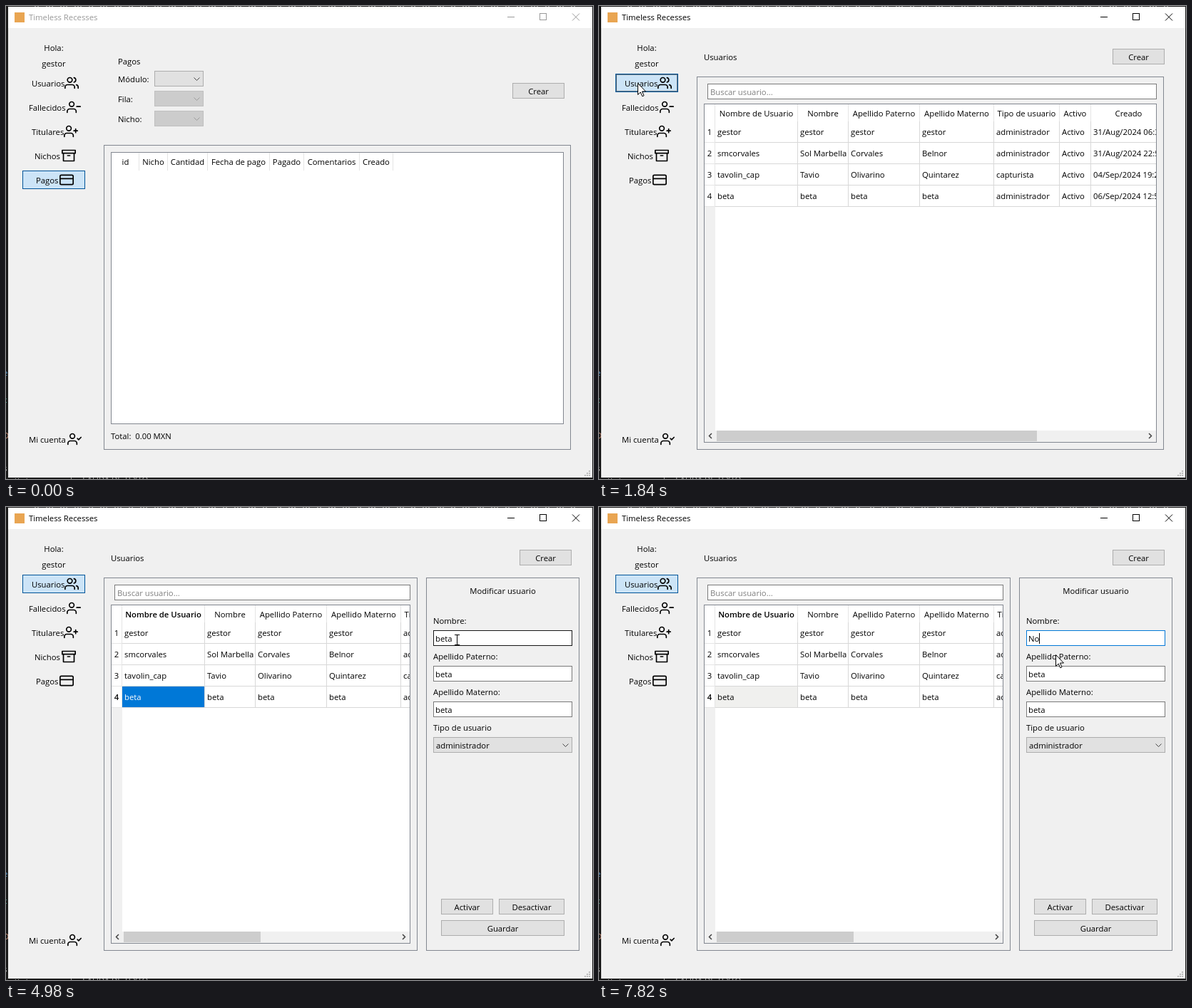
Write an HTML page with a canvas that moves like this. It is 823x664 px and loops after 8000 ms.

```html
<!DOCTYPE html>
<html lang="es">
<head>
<meta charset="utf-8">
<style>
html, body { margin: 0; width: 823px; height: 664px; overflow: hidden; background: #1b1b1b }
canvas { display: block }
</style>
</head>
<body>
<canvas id="stage" width="823" height="664"></canvas>
<script>
const ctx = document.getElementById('stage').getContext('2d');
const LOOP = 8000;
const ACTIVATE = 1570, OPEN_PAGE = 1720, SELECT_CELL = 3550, OPEN_FORM = 3640, FOCUS_FIELD = 5250;
const FONT = "11.3px 'Open Sans', 'Noto Sans', sans-serif";
const FRAME = '#828790', BLUE = '#0078d7';

const bust = 'v-2a4 4 0 0 0-4-4H5a4 4 0 0 0-4 4v2';
const person = 'M16 21' + bust + 'M12.5 7a4 4 0 1 1-8 0a4 4 0 1 1 8 0';
const menu = [
  ['Usuarios', 36, 82, 98, 'M17 21' + bust + 'M13 7a4 4 0 1 1-8 0a4 4 0 1 1 8 0M23 21v-2a4 4 0 0 0-3-3.87M16 3.13a4 4 0 0 1 0 7.75'],
  ['Fallecidos', 32, 85, 132, person + 'M23 11h-6'],
  ['Titulares', 36, 81, 166, person + 'M20 8v6M23 11h-6'],
  ['Nichos', 40, 78, 200, 'M21 8v13H3V8M1 3h22v5H1zM10 12h4'],
  ['Pagos', 42, 75, 234, 'M3 4h18a2 2 0 0 1 2 2v12a2 2 0 0 1-2 2H3a2 2 0 0 1-2-2V6a2 2 0 0 1 2-2zM1 10h22'],
  ['Mi cuenta', 32, 86, 598, person + 'M17 11l2 2 4-4']
].map(([label, textX, iconX, y, path]) => ({ label, textX, iconX, y, path: new Path2D(path) }));

const payments = ['id', 'Nicho', 'Cantidad', 'Fecha de pago', 'Pagado', 'Comentarios', 'Creado'];
const paymentEdges = [148, 186, 226, 282, 369, 417, 495, 542];

const headers = ['Nombre de Usuario', 'Nombre', 'Apellido Paterno', 'Apellido Materno', 'Tipo de usuario', 'Activo', 'Creado'];
const edges = [162, 278, 349, 449, 553, 645, 689, 795];
const rows = [
  ['gestor', 'gestor', 'gestor', 'gestor', 'administrador', 'Activo', '31/Aug/2024 06:32:10'],
  ['smcorvales', 'Sol Marbella', 'Corvales', 'Belnor', 'administrador', 'Activo', '31/Aug/2024 22:51:04'],
  ['tavolin_cap', 'Tavio', 'Olivarino', 'Quintarez', 'capturista', 'Activo', '04/Sep/2024 19:24:37'],
  ['beta', 'beta', 'beta', 'beta', 'administrador', 'Activo', '06/Sep/2024 12:53:18']
];

// Pointer path: time, x, y
const path = [
  [130, 755, 655], [480, 285, 280], [690, 137, 182], [890, 79, 136], [970, 79, 136], [1040, 54, 108],
  [2120, 54, 108], [2340, 100, 285], [2540, 163, 342], [2880, 239, 262],
  [4210, 239, 262], [4450, 330, 282], [4700, 520, 230], [4950, 632, 186],
  [5300, 632, 186], [5860, 640, 230], [6079, 640, 230], [6080, 640, 207], [LOOP, 640, 207]
];
// Contents of the name field as it is edited
const typing = [[0, 'beta'], [6830, 'bet'], [6960, 'be'], [7160, 'b'], [7290, ''], [7620, 'N'], [7820, 'No']];

function fill(x, y, w, h, color) {
  ctx.fillStyle = color;
  ctx.fillRect(x, y, w, h);
}

function box(x, y, w, h, color, border) {
  fill(x, y, w, h, border);
  fill(x + 1, y + 1, w - 2, h - 2, color);
}

function text(str, x, y, color = '#000', align = 'left', bold = false) {
  ctx.font = (bold ? '600 ' : '') + FONT;
  ctx.textAlign = align;
  ctx.fillStyle = color;
  ctx.fillText(str, x, y);
}

function line(points, color, width = 1) {
  ctx.beginPath();
  points.forEach(([x, y]) => ctx.lineTo(x, y));
  ctx.strokeStyle = color;
  ctx.lineWidth = width;
  ctx.stroke();
}

function button(label, x, y, w) {
  box(x, y, w, 22, '#e1e1e1', '#adadad');
  text(label, x + w / 2, y + 16, '#000', 'center');
}

function combo(x, y, w, enabled, label = '') {
  box(x, y, w, 22, enabled ? '#e1e1e1' : '#cccccc', enabled ? '#adadad' : '#bfbfbf');
  text(label, x + 4, y + 16);
  const cx = x + w - 9.5;
  line([[cx - 4, y + 9.5], [cx, y + 13.5], [cx + 4, y + 9.5]], enabled ? '#444' : '#9a9a9a');
}

function pointerAt(t) {
  if (t < path[0][0]) return null;
  const i = path.findIndex(p => p[0] > t);
  const [t0, x0, y0] = path[i - 1], [t1, x1, y1] = path[i];
  const k = (t - t0) / (t1 - t0);
  return { x: Math.round(x0 + (x1 - x0) * k), y: Math.round(y0 + (y1 - y0) * k) };
}

function drawDesktop() {
  fill(0, 0, 823, 664, '#1b1b1b');
  for (let x = 40; x < 800; x += 4) {
    if (Math.sin(x * 12.9) > -0.2) fill(x, 0, 2, 1, '#777');
  }
  [['e', 519, '#569cd6'], ['c', 557, '#4ec9b0'], ['D', 607, '#ce9178'], ['.', 638, '#ccc'], ['s', 653, '#ccc']]
    .forEach(([ch, y, color]) => text(ch, -4, y, color));
  text('u   i', 12, 669, '#aaa');
  text('l     SALIDA DE TEXTO', 90, 669, '#aaa');
}

function drawWindow(active) {
  const ink = active ? '#000' : '#999';
  fill(3, 1, 819, 661, '#f0f0f0');
  fill(3, 1, 819, 30, '#fff');
  fill(12, 9, 14, 14, '#e9a552');
  text('Timeless Recesses', 32, 20, ink);
  fill(703, 15, 10, 1, ink);
  box(748, 10, 10, 10, '#fff', ink);
  line([[794, 10.5], [804, 20.5]], ink);
  line([[804, 10.5], [794, 20.5]], ink);
  for (let r = 0; r < 3; r++)
    for (let c = 0; c <= r; c++) fill(817 - 3 * c, 652 + 3 * r, 2, 2, '#bbb');
}

function drawMenu(t) {
  text('Hola:', 67, 63, '#000', 'center');
  text('gestor', 67, 85, '#000', 'center');
  const lit = [];
  if (t < OPEN_PAGE) lit.push('Pagos');
  if (t >= ACTIVATE) lit.push('Usuarios');
  for (const item of menu) {
    if (lit.includes(item.label)) box(23, item.y - 3, 88, 26, '#cce4f7', '#005499');
    text(item.label, item.textX, item.y + 15);
    ctx.save();
    ctx.translate(item.iconX, item.y);
    ctx.scale(20 / 24, 20 / 24);
    ctx.lineWidth = 2;
    ctx.lineCap = ctx.lineJoin = 'round';
    ctx.strokeStyle = '#000';
    ctx.stroke(item.path);
    ctx.restore();
  }
  if (t >= ACTIVATE && t < SELECT_CELL) {
    ctx.setLineDash([1, 1]);
    ctx.strokeStyle = '#000';
    ctx.lineWidth = 1;
    ctx.strokeRect(24.5, 96.5, 85, 23);
    ctx.setLineDash([]);
  }
}

function drawPayments() {
  ['Pagos', 'Módulo:', 'Fila:', 'Nicho:'].forEach((label, i) => text(label, 157, [82, 107, 135, 163][i]));
  [91, 119, 147].forEach((y, i) => combo(208, y, 69, i === 0));
  button('Crear', 710, 108, 73);
  box(137, 195, 655, 428, '#f0f0f0', FRAME);
  box(147, 205, 635, 382, '#fff', FRAME);
  payments.forEach((label, i) => {
    text(label, (paymentEdges[i] + paymentEdges[i + 1]) / 2 + 0.5, 223, '#000', 'center');
    fill(paymentEdges[i + 1], 206, 1, 25, '#e5e5e5');
  });
  text('Total:  0.00 MXN', 147, 608);
}

function drawTable(t, right) {
  const selected = t >= SELECT_CELL, focused = t < FOCUS_FIELD;
  box(137, 99, right + 10 - 137, 524, '#f0f0f0', FRAME);
  box(152, 109, right - 152, 22, '#fff', '#7a7a7a');
  text('Buscar usuario...', 156, 125, '#7f7f7f');
  box(147, 137, right - 147, 476, '#fff', FRAME);
  fill(148, 282, 15, 314, '#f0f0f0');

  ctx.save();
  ctx.beginPath();
  ctx.rect(148, 138, right - 149, 474);
  ctx.clip();
  fill(162, 138, 1, 144, '#e5e5e5');
  if (selected) fill(163, 252, 115, 29, focused ? BLUE : '#f0f0ee');
  headers.forEach((label, c) => {
    text(label, (edges[c] + edges[c + 1]) / 2 + 0.5, 155, '#000', 'center', selected && c === 0);
    fill(edges[c + 1], 138, 1, 24, '#e5e5e5');
    fill(edges[c + 1], 162, 1, 120, '#d8d8d8');
  });
  rows.forEach((row, r) => {
    const y = 181 + 30 * r, last = selected && r === 3;
    text(r + 1, 155, y, '#000', 'center', last);
    fill(148, y + 10, 14, 1, '#e5e5e5');
    fill(163, y + 10, 632, 1, '#d8d8d8');
    row.forEach((cell, c) => text(cell, edges[c] + 4, y, last && focused && c === 0 ? '#fff' : '#000'));
  });
  ctx.restore();

  fill(148, 596, right - 149, 16, '#f0f0f0');
  fill(165, 596, right === 782 ? 449 : 192, 15, '#cdcdcd');
  line([[158, 600], [154.5, 603.5], [158, 607]], '#444', 1.5);
  line([[right - 11, 600], [right - 7.5, 603.5], [right - 11, 607]], '#444', 1.5);
}

function overField(p, y) {
  return p && p.x >= 599 && p.x < 794 && p.y >= y && p.y < y + 22;
}

function drawForm(t, pointer) {
  const name = typing.filter(([at]) => at <= t).pop()[1];
  const editing = t >= FOCUS_FIELD;
  box(589, 99, 215, 524, '#f0f0f0', FRAME);
  text('Modificar usuario', 696.5, 122, '#000', 'center');
  [['Nombre:', name], ['Apellido Paterno:', 'beta'], ['Apellido Materno:', 'beta']].forEach(([label, value], i) => {
    const y = 173 + 50 * i;
    const hover = overField(pointer, y) || (i === 1 && t >= 6080 && t < 6290);
    text(label, 599, y - 9);
    box(599, y, 195, 22, '#fff', editing && i === 0 ? BLUE : hover ? '#171717' : '#7a7a7a');
    text(value, 602, y + 16);
  });
  if (editing && (t < 5780 || t >= 6290)) {
    ctx.font = FONT;
    fill(602 + Math.round(ctx.measureText(name).width), 177, 1, 15, '#000');
  }
  text('Tipo de usuario', 599, 314);
  combo(599, 323, 195, true, 'administrador');
  button('Activar', 610, 550, 73);
  button('Desactivar', 691, 550, 92);
  button('Guardar', 610, 580, 173);
}

function drawPointer({ x, y }, beam) {
  if (beam) {
    fill(x, y - 7, 1, 15, '#000');
    for (const end of [y - 7, y + 7]) {
      fill(x - 3, end, 3, 1, '#000');
      fill(x + 1, end, 3, 1, '#000');
    }
    return;
  }
  const arrow = new Path2D('M.5 .5V16.5L4.2 13L6.8 18.8L9 17.8L6.5 12H11.5Z');
  ctx.save();
  ctx.translate(x, y);
  ctx.fillStyle = '#fff';
  ctx.strokeStyle = '#000';
  ctx.lineWidth = 1;
  ctx.fill(arrow);
  ctx.stroke(arrow);
  ctx.restore();
}

function draw(now) {
  const t = now % LOOP;
  const pointer = pointerAt(t), formOpen = t >= OPEN_FORM;
  drawDesktop();
  drawWindow(t >= ACTIVATE);
  drawMenu(t);
  if (t < OPEN_PAGE) {
    drawPayments();
  } else {
    text('Usuarios', 147, 76);
    button('Crear', 720, 60, 73);
    drawTable(t, formOpen ? 567 : 782);
    if (formOpen) drawForm(t, pointer);
  }
  if (pointer) drawPointer(pointer, formOpen && [173, 223, 273].some(y => overField(pointer, y)));
  requestAnimationFrame(draw);
}
requestAnimationFrame(draw);
</script>
</body>
</html>
```
